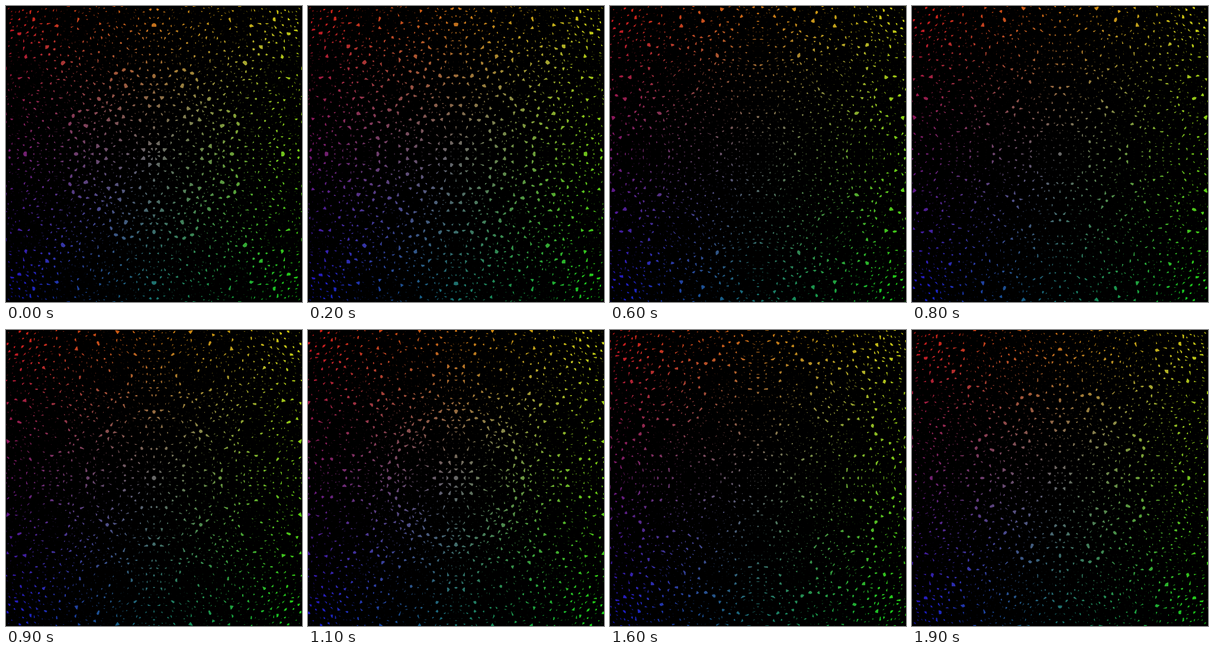
An HTML page with a canvas that plays this animation: 500 px wide and 500 px high, repeating every 2000 ms.

```html
<!DOCTYPE html>
<html lang="en">
<head>
<meta charset="utf-8">
<title>Ripples</title>
<style>
  html, body { margin: 0; width: 100%; height: 100%; overflow: hidden; background: #000; }
  canvas { display: block; width: 500px; height: 500px; }
</style>
</head>
<body>
<canvas id="stage" width="500" height="500"></canvas>
<script>
const SIZE = 500, HALF = SIZE / 2;
const LOOP = 2000, STEP = 100;
const SOURCES = 8, GAP = 12.5, LINE = 4, REACH = 610;
const GREY = 104;
const RED = [208, 22, 22], YELLOW = [206, 206, 14], GREEN = [20, 208, 20], BLUE = [22, 22, 204];

const ctx = document.getElementById('stage').getContext('2d');
const mix = (a, b, k) => a + (b - a) * k;

// Four corner colours run along the edges and fade to grey in the middle.
function paintBackdrop() {
  const layer = document.createElement('canvas');
  layer.width = layer.height = SIZE;
  const c = layer.getContext('2d');
  const img = c.createImageData(SIZE, SIZE);
  for (let y = 0, i = 0; y < SIZE; y++) {
    for (let x = 0; x < SIZE; x++, i += 4) {
      const dx = (x + 0.5) / HALF - 1, dy = (y + 0.5) / HALF - 1;
      const m = Math.max(Math.abs(dx), Math.abs(dy));
      const u = (dx / m + 1) / 2, v = (dy / m + 1) / 2;
      for (let n = 0; n < 3; n++) {
        const edge = mix(mix(RED[n], YELLOW[n], u), mix(BLUE[n], GREEN[n], u), v);
        img.data[i + n] = mix(GREY, edge, m);
      }
      img.data[i + 3] = 255;
    }
  }
  c.putImageData(img, 0, 0);
  return layer;
}

const backdrop = paintBackdrop();

// Black rings spread from eight points on a circle.
function draw(phase) {
  ctx.drawImage(backdrop, 0, 0);
  ctx.strokeStyle = '#000';
  ctx.lineWidth = LINE;
  for (let n = 0; n < SOURCES; n++) {
    const a = n / SOURCES * 2 * Math.PI;
    const x = HALF + HALF * Math.cos(a), y = HALF + HALF * Math.sin(a);
    for (let r = phase * GAP; r < REACH; r += GAP) {
      ctx.beginPath();
      ctx.arc(x, y, r, 0, 2 * Math.PI);
      ctx.stroke();
    }
  }
}

const start = performance.now();
let shown = -1;
function tick() {
  const step = Math.floor((performance.now() - start) % LOOP / STEP);
  if (step !== shown) {
    shown = step;
    draw(step * STEP / LOOP);
  }
  requestAnimationFrame(tick);
}
tick();
</script>
</body>
</html>
```
